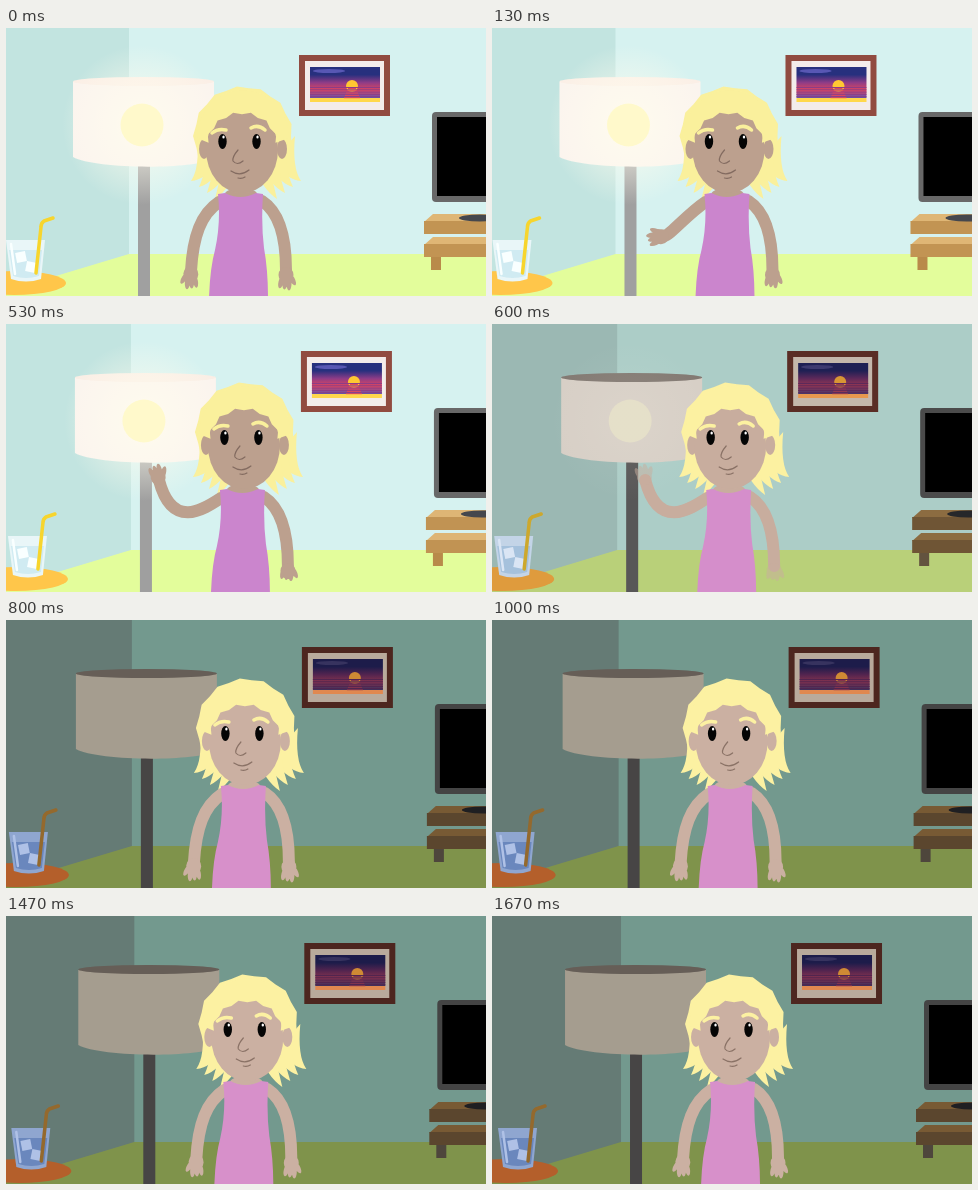
Recreate the animation shown at these times as an HTML page with a canvas. Size 480x268 px, loop 1740 ms.

```html
<!DOCTYPE html>
<html lang="en">
<head>
<meta charset="utf-8">
<title>Lights out</title>
<style>
  html, body { margin: 0; width: 100%; height: 100%; overflow: hidden; background: #73998e; }
  canvas { display: block; width: 100vw; height: 100vh; }
</style>
</head>
<body>
<canvas id="stage" width="480" height="268"></canvas>
<script>
const ctx = document.getElementById('stage').getContext('2d');
const LOOP = 1740, STEP = LOOP / 26;

// Colours as [lamp on, lamp off]; props darken sooner than the room
const room = {
  wall: ['#d6f2f0', '#73998e'], side: ['#c2e4e0', '#657b75'],
  floor: ['#e3fd9b', '#7f934b'], shade: ['#fbf4ee', '#a59d8f'],
  table: ['#ffc64a', '#b45f2b'], glass: ['#e9f6f8', '#8fa6d0'],
  water: ['#d0ebf2', '#6a87bd'], ice: ['#f9ffff', '#afc1e6'],
  straw: ['#f7d52d', '#94692d']
};
const props = {
  inner: ['#fbefe6', '#665e57'], pole: ['#a0a0a0', '#474545'],
  frame: ['#914b40', '#4d261f'], mat: ['#f3eceb', '#b9aa9c'],
  sky: ['#27307e', '#1d1c4a'], dusk: ['#8d3c87', '#52244f'],
  glow: ['#e0475d', '#86344e'], sea: ['#5857b4', '#37335f'],
  sun: ['#ffc832', '#cf8a34'], beach: ['#ffd84c', '#e08850'],
  bezel: ['#686868', '#444444'], base: ['#45474d', '#1f1f22'],
  board: ['#dfb675', '#785a34'], front: ['#c29453', '#5b462e'],
  leg: ['#b98a4a', '#4e463c'],
  hair: ['#faf09c', '#fcf1a2'], skin: ['#bca08e', '#cbb0a2'],
  line: ['#836b60', '#8a7266'], dress: ['#cb85cd', '#d790ca']
};

const clamp = v => Math.max(0, Math.min(1, v));
const lerp = (a, b, k) => a + (b - a) * k;
const ease = k => k * k * (3 - 2 * k);
const channels = hex => [1, 3, 5].map(i => parseInt(hex.slice(i, i + 2), 16));

function tint(group, light, out) {
  for (const key in group) {
    const [on, off] = group[key].map(channels);
    out[key] = `rgb(${on.map((v, i) => Math.round(lerp(off[i], v, light)))})`;
  }
}

function rect(color, x, y, w, h) { ctx.fillStyle = color; ctx.fillRect(x, y, w, h); }

function shape(color, path) { ctx.fillStyle = color; ctx.fill(new Path2D(path)); }

function oval(color, x, y, rx, ry) {
  ctx.fillStyle = color;
  ctx.beginPath();
  ctx.ellipse(x, y, rx, ry, 0, 0, Math.PI * 2);
  ctx.fill();
}

function stroke(color, width, path) {
  ctx.strokeStyle = color;
  ctx.lineWidth = width;
  ctx.stroke(new Path2D(path));
}

function drawRoom(c) {
  rect(c.wall, -20, 0, 520, 268);
  rect(c.floor, -20, 226, 520, 42);
  shape(c.side, 'M-20 0 H123 V226 L-20 269 Z');
}

function drawPicture(c) {
  rect(c.frame, 293, 27, 91, 61);
  rect(c.mat, 299, 33, 79, 49);
  const view = ctx.createLinearGradient(0, 39, 0, 70);
  [c.sky, c.sky, c.dusk, c.glow, c.sea].forEach((color, i) => view.addColorStop(i / 4, color));
  rect(view, 304, 39, 70, 31);
  rect(c.beach, 304, 70, 70, 4);
  oval(c.sea, 323, 43, 16, 2);
  oval(c.sun, 346, 58, 6, 6);
  for (let i = 0; i < 5; i++) {
    rect(c.dusk, 304, 59 + i * 2.3, 70, 1);
    rect(c.glow, 342 - i, 60 + i * 2.3, 8 + i * 2, 1);
  }
}

function drawTv(c) {
  for (const y of [186, 209]) {
    shape(c.board, `M427 ${y} H500 V${y + 8} H418 Z`);
    rect(c.front, 418, y + 7, 82, 13);
  }
  rect(c.leg, 425, 229, 10, 13);
  oval(c.base, 474, 190, 21, 3.5);
  ctx.fillStyle = c.bezel;
  ctx.beginPath();
  ctx.roundRect(426, 84, 90, 90, 4);
  ctx.fill();
  rect('#000', 431, 89, 70, 79);
}

function drawDrink(c) {
  oval(c.table, 8, 255, 52, 12);
  shape(c.glass, 'M0 212 H39 L35 251 Q20 256 5 251 Z');
  shape(c.water, 'M3 222 H36 L33 248 Q20 252 7 248 Z');
  for (const [x, y, turn] of [[15, 229, -0.2], [25, 239, 0.2]]) {
    ctx.save();
    ctx.translate(x, y);
    ctx.rotate(turn);
    rect(c.ice, -5, -5, 10, 10);
    ctx.restore();
  }
  stroke(c.straw, 3.5, 'M30 245 L35 199 Q35 195 38 193 L47 190');
  stroke(c.ice, 2.5, 'M5 216 L9 246');
}

function drawLamp(c, light) {
  rect(c.pole, 132, 130, 12, 138);
  shape(c.shade, 'M67 54 V129 C88 141 184 142 208 131 V54 Z');
  oval(c.inner, 137.5, 53.5, 70.5, 4.5);
  if (!light) return;
  const halo = ctx.createRadialGradient(136, 97, 15, 136, 97, 80);
  [0.75, 0.5, 0.25, 0].forEach((a, i) =>
    halo.addColorStop(i / 3, `rgba(255,252,238,${a * light ** 4})`));
  rect(halo, 40, 5, 190, 190);
  oval(`rgba(255,250,200,${0.9 * light ** 2})`, 136, 97, 21.5, 21.5);
}

// A single fill keeps overlapping fingers even when translucent
function drawHand(color, x, y, angle, flip, reach, alpha) {
  ctx.save();
  ctx.globalAlpha = alpha;
  ctx.translate(x, y);
  ctx.rotate(angle);
  ctx.scale(flip, 1);
  ctx.beginPath();
  const part = (px, py, rx, ry, turn) => {
    ctx.moveTo(px, py);
    ctx.ellipse(px, py, rx, ry, turn, 0, Math.PI * 2);
  };
  part(0, 3, 7.5, 8, 0);
  part(-6, 7 * reach, 2.6, 7, 0.5);
  for (let i = 0; i < 3; i++) part(i * 4 - 3, 12 * reach - i, 2.5, 6.5, -0.12 * i);
  ctx.fillStyle = color;
  ctx.fill();
  ctx.restore();
}

function drawArms(c, raise, alpha) {
  const elbowX = lerp(187, 164, raise), elbowY = lerp(208, 206, raise);
  const x = lerp(185, 151, raise), y = lerp(243, 156, raise);
  stroke(c.skin, 12, `M213 174 C195 186 ${elbowX} ${elbowY} ${x} ${y}`);
  const angle = Math.atan2(y - elbowY, x - elbowX) - Math.PI / 2;
  drawHand(c.skin, x, y, angle, 1, 1 - raise * 0.2, alpha);
  stroke(c.skin, 12, 'M256 173 C273 184 280 208 280 242');
  drawHand(c.skin, 280, 244, 0, -1, 1 - raise * 0.45, alpha);
}

// Adds an elliptical arc with n alternating inward and outward points
function jag(x, y, rx, ry, from, to, n, depth) {
  for (let i = 0; i <= n; i++) {
    const a = lerp(from, to, i / n), r = 1 + (i % 2 ? depth : -depth);
    ctx.lineTo(x + Math.cos(a) * rx * r, y + Math.sin(a) * ry * r);
  }
}

function drawBackHair(color) {
  ctx.fillStyle = color;
  ctx.beginPath();
  jag(237, 108, 49, 49, 0, Math.PI * 2, 26, 0.02);
  ctx.fill();
  for (const side of [-1, 1]) {
    for (let i = 0; i < 4; i++) {
      const x = d => 240 + side * (d - i * 8);
      ctx.beginPath();
      ctx.moveTo(x(49), 108);
      ctx.quadraticCurveTo(x(46), 140, x(55), 153 + i * 6);
      ctx.quadraticCurveTo(x(40), 152 + i * 3, x(28), 132);
      ctx.fill();
    }
  }
}

function drawFringe(color) {
  ctx.fillStyle = color;
  ctx.beginPath();
  jag(237, 110, 46, 48, -Math.PI, 0, 14, 0);
  jag(236, 118, 35, 33, -0.1, 0.1 - Math.PI, 12, 0.04);
  ctx.fill();
}

function drawFace(c) {
  for (const x of [198, 276]) oval(c.skin, x, 121, 5, 10);
  oval(c.skin, 236, 122, 36, 43);
  drawFringe(c.hair);
  stroke(c.hair, 3.5, 'M206 105 Q212 100 220 102 M245 100 Q252 96 259 102');
  for (const x of [216.5, 250.5]) {
    oval('#050505', x, 113.5, 4.2, 7.6);
    oval('#fff', x + 1, 109, 1.2, 1.6);
  }
  stroke(c.line, 1.2, 'M232 122 Q226 129 227 133 Q231 138 237 133 M225 143 Q234 149 243 142 M232 150 Q236 151 239 149');
}

function drawGirl(c, raise, alpha) {
  drawBackHair(c.hair);
  drawArms(c, raise, alpha);
  oval(c.skin, 235, 166, 16, 6);
  shape(c.dress, 'M212 166 L219 165 Q234 173 250 165 L257 166 Q255 195 258 220 Q262 242 262 270 H203 Q204 240 209 222 Q215 195 212 166 Z');
  drawFace(c);
}

function draw(now) {
  const t = Math.floor((now % LOOP + 7) / STEP) % 26 * STEP;
  const light = clamp((695 - t) / 160);
  const raise = ease(clamp((t - 30) / 240)) * (1 - ease(clamp((t - 605) / 170)));
  const alpha = 1 - 2 * light * (1 - light);
  const c = {};
  tint(room, light, c);
  tint(props, light ** 3, c);

  ctx.lineCap = ctx.lineJoin = 'round';
  ctx.save();
  ctx.translate(t * 0.0036, 0);
  drawRoom(c);
  drawPicture(c);
  drawTv(c);
  drawLamp(c, light);
  drawDrink(c);
  drawGirl(c, raise, alpha);
  ctx.restore();
}

const start = performance.now();
function tick() {
  draw(performance.now() - start);
  requestAnimationFrame(tick);
}
tick();
</script>
</body>
</html>
```
